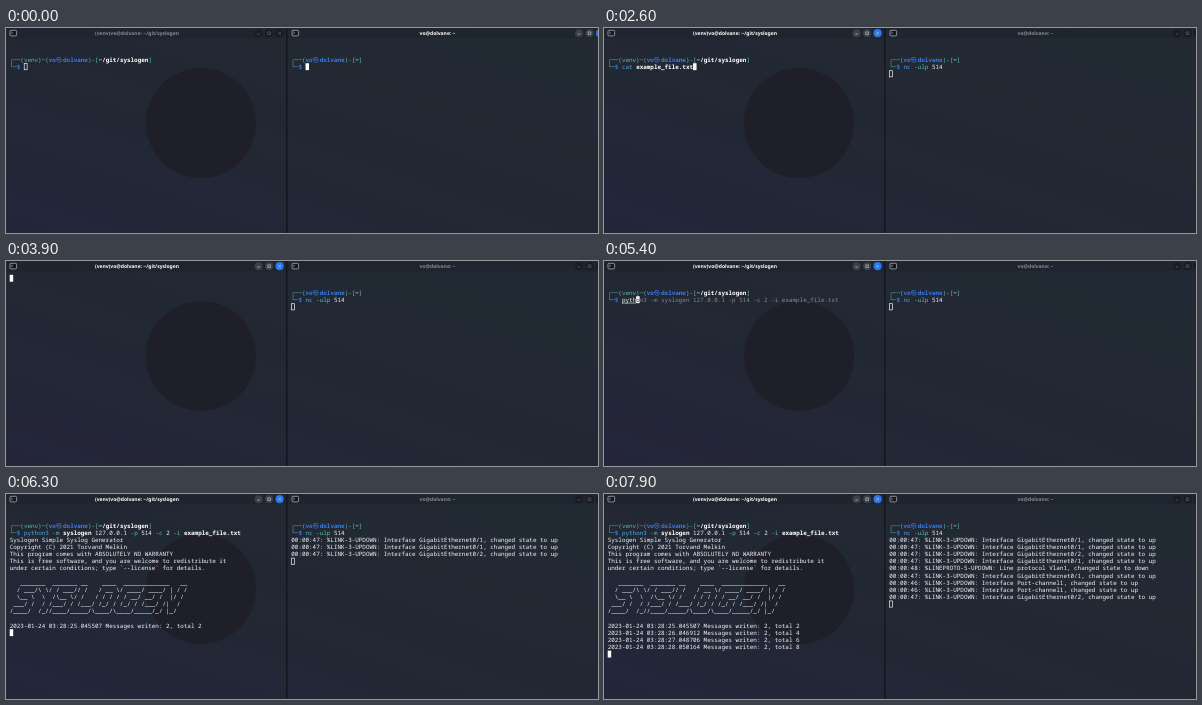
These frames come from a looping animation (592 px wide and 205 px high, 8000 ms). An HTML page:

```html
<!DOCTYPE html>
<html lang="en">
<head>
<meta charset="utf-8">
<title>Syslog generator demo</title>
<style>
  html, body { margin: 0; width: 100%; height: 100%; overflow: hidden; background: #222833; }
  svg { display: block; width: 592px; height: 205px; }
  text { white-space: pre; text-rendering: geometricPrecision; fill: #f4f6f8; }
  .cells text { font: 500 5.93px "Noto Sans Mono", "Noto Sans CJK KR", "Noto Sans CJK JP", monospace; }
  .cells .line { fill: #5ebdab; font-weight: 400; }
  .cells .user { fill: #367bf0; font-weight: 700; }
  .cells .path { fill: #fff; font-weight: 700; }
  .cells .cmd { fill: #49aee6; }
  .cells .opt { fill: #5ebdab; }
  .cells .hint { fill: #83878f; }
  .cells .unknown { text-decoration: underline; }
  .cells .under { fill: #222633; }
  .title { font: 600 5px "Noto Sans", sans-serif; text-anchor: middle; fill: #868a92; }
  .button { fill: #191c24; }
  .icon { fill: #15181f; stroke: #b9bdc4; stroke-width: .7; }
  .glyph { fill: none; stroke: #5d626c; stroke-width: .7; }
  .focused .title { fill: #fff; }
  .focused .button { fill: #3b404b; }
  .focused .close { fill: #2777f2; }
  .focused .glyph { stroke: #bcc0c8; }
</style>
</head>
<body>
<svg viewBox="0 0 592 205" xmlns="http://www.w3.org/2000/svg">
  <defs>
    <linearGradient id="desk" x1="0" y1="1" x2="1" y2="0">
      <stop offset="0" stop-color="#24253a" stop-opacity=".95"/>
      <stop offset=".5" stop-color="#222833"/>
      <stop offset="1" stop-color="#222b35"/>
    </linearGradient>
  </defs>
  <rect width="592" height="205" fill="url(#desk)"/>
  <circle cx="195" cy="95" r="55" fill="#1f1f29"/>
  <rect width="592" height="10.5" fill="#1c1f28" opacity=".4"/>
  <rect x="280" width="1.5" height="205" fill="#14161d"/>
  <g id="bars"></g>
  <g id="cells" class="cells"></g>
</svg>
<script>
const LOOP = 8000, TICK = 100;
const CELL = 3.556, LINE = 7.14, TOP = 31.5;
const LEFT = 3.7, RIGHT = 285.3;
const HOST = ["vo", "dolvane"];

const LISTEN = "nc -ulp 514";
const SHOW = "cat example_file.txt";
const SEND = "python3 -m syslogen 127.0.0.1 -p 514 -c 2 -i example_file.txt";

const link = (sec, port) => `00:00:${sec}: %LINK-3-UPDOWN: Interface ${port}, changed state to up`;
const vlan = state => `00:00:48: %LINEPROTO-5-UPDOWN: Line protocol Vlan1, changed state to ${state}`;
const gig1 = link(47, "GigabitEthernet0/1");
const gig2 = link(47, "GigabitEthernet0/2");
const channel = link(46, "Port-channel1");

const FILE = [channel, gig1, gig2, vlan("down"), vlan("up")];
const RECEIVED = [gig1, gig1, gig2, gig1, vlan("down"), gig1, channel, channel, gig2];
const BANNER = String.raw`Syslogen Simple Syslog Generator
Copyright (C) 2021 Torvand Melkin
This program comes with ABSOLUTELY NO WARRANTY
This is free software, and you are welcome to redistribute it
under certain conditions; type ${"`"}--license${"`"} for details.

   _______  _______ __    ____  _____________   __
  / ___/\ \/ / ___// /   / __ \/ ____/ ____/ | / /
  \__ \  \  /\__ \/ /   / / / / / __/ __/ /  |/ /
 ___/ /  / /___/ / /___/ /_/ / /_/ / /___/ /|  /
/____/  /_//____/_____/\____/\____/_____/_/ |_/
`.split("\n");
const LOG = ["25.045507", "26.046912", "27.048706", "28.050164"].map(
  (sec, i) => `2023-01-24 03:28:${sec} Messages writen: 2, total ${2 * i + 2}`);

// Key presses and arrivals, in ms
const keys = {
  listen: [100, 200, 300, 400, 600, 700, 800, 900, 1000, 1100, 1200],
  show: [1600, 1700, 1800, 1900, 2000, 2100, 2200, 2300, 2400, 2500],
  clear: [3000, 3100, 3200, 3300, 3400],
  send: [5100, 5200, 5300, 5400],
  received: [5900, 6100, 6300, 6500, 6800, 7000, 7200, 7500, 7700],
  log: [6300, 6800, 7200, 7700]
};
const at = { listening: 1300, switchPane: 1500, complete: 2600, shown: 2800, cleared: 3900,
             prompt: 4000, accept: 5600, run: 5700, banner: 5900 };

const barsNode = document.getElementById("bars");
const cellsNode = document.getElementById("cells");
let out = "";

const escape = s => s.replace(/&/g, "&amp;").replace(/</g, "&lt;");
const passed = (times, t) => times.filter(x => x <= t).length;

function put(x0, row, col, text, cls = "") {
  const y = TOP + row * LINE + 2.1;
  out += `<text class="${cls}" x="${x0 + col * CELL}" y="${y}">${escape(text)}</text>`;
}

function lines(x0, row, list) {
  list.forEach((text, i) => put(x0, row + i, 0, text));
}

function cursor(x0, row, col, solid) {
  const x = x0 + col * CELL, y = TOP + row * LINE - 3.4;
  out += solid
    ? `<rect x="${x}" y="${y}" width="3.5" height="6.9" fill="#fff"/>`
    : `<rect x="${x + .3}" y="${y + .3}" width="2.9" height="6.2" fill="none" stroke="#eef0f3" stroke-width=".7"/>`;
}

function prompt(x0, row, env, path) {
  let col = 0;
  const add = (text, cls, width = text.length) => {
    put(x0, row, col, text, cls);
    col += width;
  };
  add("┌──(" + env, "line");
  add(HOST[0], "user");
  add("㉿", "user", 2);
  add(HOST[1], "user");
  add(")-[", "line");
  add(path, "path");
  add("]", "line");
  put(x0, row + 1, 0, "└─", "line");
  put(x0, row + 1, 2, "$", "user");
}
const leftPrompt = row => prompt(LEFT, row, "venv)─(", "~/git/syslogen");

function styleOf(word, first, whole) {
  if (first) return whole ? "cmd" : "unknown";
  if (word[0] === "-") return "opt";
  return whole && /^syslogen$|_file/.test(word) ? "path" : "";
}

function command(x0, row, text, n = text.length) {
  for (const { 0: word, index } of text.matchAll(/\S+/g)) {
    const part = word.slice(0, Math.max(0, n - index));
    if (part) put(x0, row, 4 + index, part, styleOf(part, index === 0, part === word));
  }
}

function rightPane(t) {
  const focused = t < at.switchPane;
  const typed = passed(keys.listen, t);
  const count = passed(keys.received, t);
  prompt(RIGHT, 0, "", "~");
  command(RIGHT, 1, LISTEN, typed);
  lines(RIGHT, 2, RECEIVED.slice(0, count));
  if (t < at.listening) cursor(RIGHT, 1, 4 + typed, focused);
  else cursor(RIGHT, 2 + count, 0, focused);
}

function leftShow(t) {
  const typed = t < at.complete ? passed(keys.show, t) : SHOW.length;
  leftPrompt(0);
  command(LEFT, 1, SHOW, typed);
  if (t < at.shown) return cursor(LEFT, 1, 4 + typed, t >= at.switchPane);
  const row = 2 + FILE.length + 1;
  const cleared = passed(keys.clear, t);
  lines(LEFT, 2, FILE);
  leftPrompt(row);
  command(LEFT, row + 1, "clear", cleared);
  cursor(LEFT, row + 1, 4 + cleared, true);
}

function leftSend(t) {
  leftPrompt(0);
  if (t < at.accept) {
    const typed = passed(keys.send, t);
    command(LEFT, 1, SEND, typed);
    cursor(LEFT, 1, 4 + typed, true);
    if (typed) {
      put(LEFT, 1, 4 + typed, SEND[typed], "under");
      put(LEFT, 1, 5 + typed, SEND.slice(typed + 1), "hint");
    }
    return;
  }
  command(LEFT, 1, SEND);
  if (t < at.run) return cursor(LEFT, 1, 4 + SEND.length, true);
  const shown = t < at.banner ? [] : [...BANNER, ...LOG.slice(0, passed(keys.log, t))];
  lines(LEFT, 2, shown);
  cursor(LEFT, 2 + shown.length, 0, true);
}

function leftPane(t) {
  if (t < at.cleared) leftShow(t);
  else if (t < at.prompt) cursor(LEFT, -2, 0, true);
  else leftSend(t);
}

function bar(x, middle, buttons, title, focused) {
  const [low, high, close] = [0, 10.5, 21].map(d => buttons + d);
  return `<g class="${focused ? "focused" : ""}">
    <rect class="icon" x="${x}" y="2.3" width="6.6" height="5.6" rx="1"/>
    <path class="icon" d="M${x + 1.3} 3.8l1.2 1-1.2 1"/>
    <text class="title" x="${middle}" y="7">${title}</text>
    <circle class="button" cx="${low}" cy="5.2" r="4"/>
    <circle class="button" cx="${high}" cy="5.2" r="4"/>
    <circle class="button close" cx="${close}" cy="5.2" r="4.1"/>
    <path class="glyph" d="M${low - 1.4} 6h2.8M${high - 1.3} 3.9h2.6v2.6h-2.6z"/>
    <path class="glyph" d="M${close - 1.4} 3.8l2.8 2.8m0-2.8l-2.8 2.8"/>
  </g>`;
}

function draw(t) {
  const name = HOST.join("@");
  const rightFocused = t < at.switchPane;
  barsNode.innerHTML =
    bar(4, 131, 252.6, `(venv)${name}: ~/git/syslogen`, !rightFocused) +
    bar(286, 431.5, 573, `${name}: ~`, rightFocused);
  out = "";
  leftPane(t);
  rightPane(t);
  cellsNode.innerHTML = out;
}

let last = -1;
function frame() {
  const t = Math.floor(performance.now() % LOOP / TICK) * TICK;
  if (t !== last) draw(last = t);
  requestAnimationFrame(frame);
}
frame();
</script>
</body>
</html>
```
